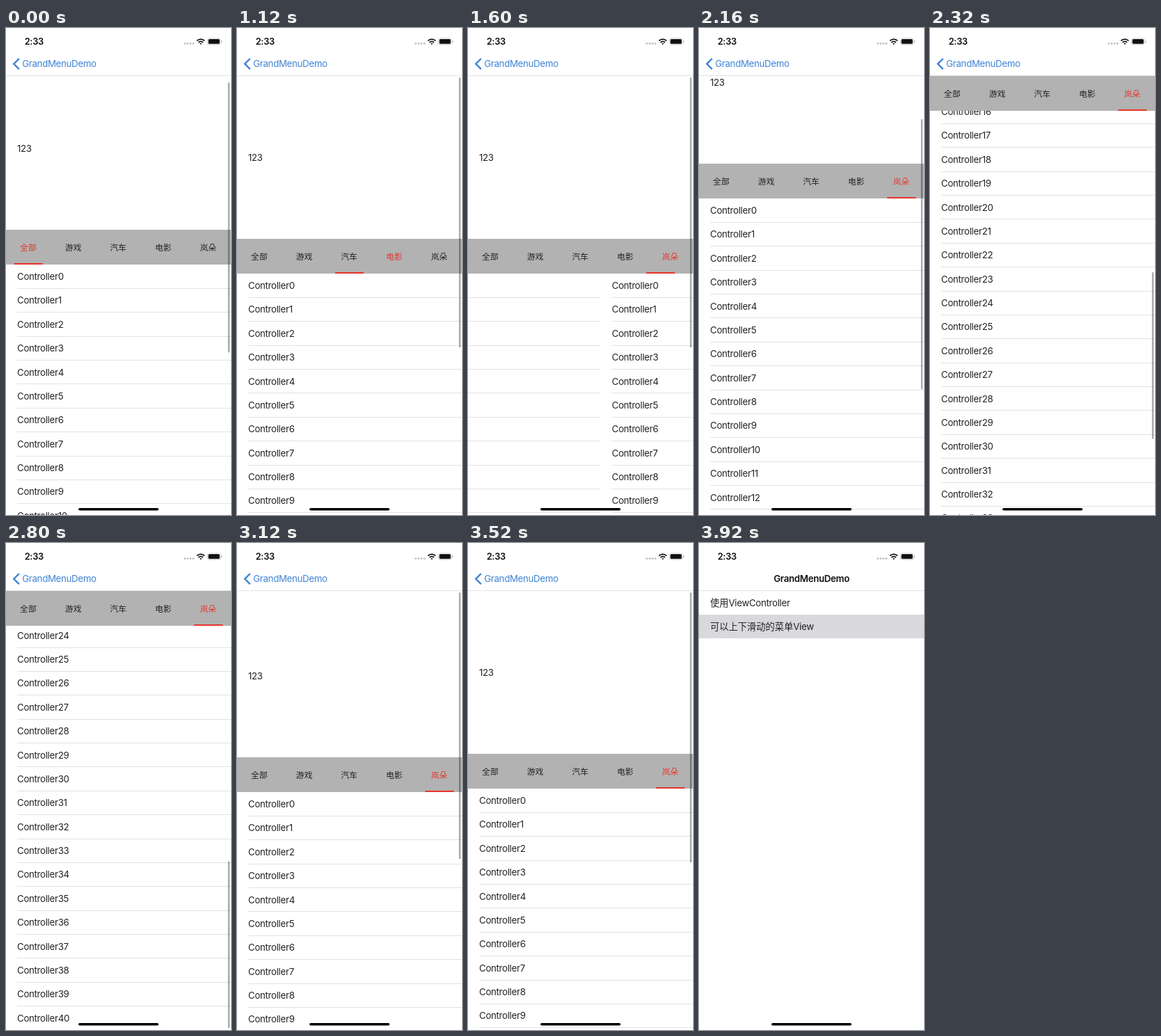
An HTML page with a canvas for the animation above (4.48 s loop, 323x700 px).

```html
<!DOCTYPE html>
<html lang="zh-CN">
<head>
<meta charset="utf-8">
<title>GrandMenuDemo</title>
<style>
html, body { margin: 0; width: 100%; height: 100%; overflow: hidden; background: #fff; }
canvas { display: block; width: 323px; height: 700px; }
</style>
</head>
<body>
<canvas id="stage"></canvas>
<script>
const W = 323, H = 700, LOOP = 4480;
const NAV = 69, HEADER = 234, MENU = 50, ROW = 34.375, ROWS = 41;
const MAX = NAV + HEADER + MENU + ROW * ROWS - H;
const TABS = ['全部', '游戏', '汽车', '电影', '岚朵'];
const BLUE = [62, 132, 214], INK = '#222', RED = '#e8342b';
const FONT = 'Inter, "Noto Sans CJK SC", "Noto Sans CJK", sans-serif';

const canvas = document.getElementById('stage');
const g = canvas.getContext('2d');
const dpr = window.devicePixelRatio || 1;
canvas.width = W * dpr;
canvas.height = H * dpr;

// The screen refreshes only at these moments.
const every80 = (from, to) => Array.from({ length: (to - from) / 80 + 1 }, (_, i) => from + i * 80);
const ticks = [0, 1120, 1360, ...every80(1520, 1760), ...every80(2160, 2640),
  2800, ...every80(3040, 3280), 3520, 3840, 3920];

const scrollKeys = [[0, 13], [1120, 0], [2080, 0], [2160, 108], [2240, 440], [2320, 800],
  [2400, 1060], [2480, 1155], [2560, 1108], [2640, 1072], [2800, MAX], [2960, MAX],
  [3040, 520], [3120, -5], [3200, -22], [3280, -9], [3520, 0]];
const pageKeys = [[1440, 0], [1520, .08], [1600, .41], [1680, .85], [1760, 1]];
const tabKeys = [[0, 0], [1120, 2], [1360, 3], [1440, 3], [1520, 3.25], [1600, 3.78], [1680, 4]];
const popKeys = [[3760, 0], [3840, .72], [3920, 1]];

function at(keys, t) {
  const i = keys.findIndex(k => k[0] > t);
  if (i === 0) return keys[0][1];
  if (i < 0) return keys[keys.length - 1][1];
  const [t0, a] = keys[i - 1], [t1, b] = keys[i];
  return a + (b - a) * (t - t0) / (t1 - t0);
}

function rect(x, y, w, h, color) {
  g.fillStyle = color;
  g.fillRect(x, y, w, h);
}

function pill(x, y, w, h, r, color) {
  g.fillStyle = color;
  g.beginPath();
  g.roundRect(x, y, w, h, r);
  g.fill();
}

// Draws text around a vertical centre; Chinese keeps its natural spacing.
function text(str, x, y, color = INK, weight = 400, size = 13.26) {
  const han = str.match(/^[^\x00-\x7f]*/)[0];
  g.fillStyle = color;
  g.font = `${weight} ${size}px ${FONT}`;
  g.letterSpacing = '0px';
  g.fillText(han, x, y + 4.7);
  const latinX = x + g.measureText(han).width;
  g.letterSpacing = '-0.3px';
  g.fillText(str.slice(han.length), latinX, y + 4.7);
}

function list(x, top) {
  for (let i = 0; i < ROWS; i++) {
    const y = top + i * ROW;
    if (y > H || y < -ROW) continue;
    text('Controller' + i, x + 16, y + 17.4);
    rect(x + 16, Math.floor(y + ROW), W - 16, 1, '#e2e2e2');
  }
}

function menu(y, tab, selected) {
  rect(0, y, W, MENU, '#b2b2b2');
  const step = W / TABS.length;
  TABS.forEach((name, i) =>
    text(name, step * (i + .5) - 12.2, y + 25, i === selected ? RED : INK, 400, 11.8));
  rect(step * (tab + .5) - 20.5, y + MENU - 2, 41, 2, RED);
}

function scrollBar(scroll) {
  let y, len;
  if (scroll <= HEADER) {
    y = 71 + Math.max(0, scroll) * .556;
    len = 388.5 + Math.min(0, scroll);
  } else {
    const over = Math.max(0, scroll - MAX);
    const part = Math.min(1, (scroll - HEADER) / (MAX - HEADER));
    len = 240 - over * .87;
    y = 121 + part * (697.5 - 121 - len);
  }
  pill(318.7, y, 2.3, len, 1.15, 'rgba(0,0,0,.35)');
}

function menuScreen(t) {
  const scroll = at(scrollKeys, t), page = at(pageKeys, t);
  const top = NAV + HEADER - scroll;
  rect(0, 0, W, H, '#fff');
  if (page < 1) list(-page * W, top + MENU);
  if (page > 0) list((1 - page) * W, top + MENU);
  if (top > NAV) {
    rect(0, 0, W, top, '#fff');
    text('123', 16, top - HEADER / 2);
  }
  menu(Math.max(NAV, top), at(tabKeys, t), t < 1120 ? 0 : t < 1520 ? 3 : 4);
  scrollBar(scroll);
}

function rootScreen() {
  rect(0, 0, W, H, '#fff');
  text('使用ViewController', 16, 86);
  rect(0, 103, W, 34, '#d9d9dd');
  text('可以上下滑动的菜单View', 16, 120.3);
}

function statusBar() {
  text('2:33', 26.7, 19.5, '#111', 600, 12.8);
  g.fillStyle = '#c4c4c4';
  for (let i = 0; i < 4; i++) {
    g.beginPath();
    g.arc(256.7 + i * 4.1, 22.3, 1.5, 0, 7);
    g.fill();
  }
  g.strokeStyle = '#111';
  g.lineWidth = 1.8;
  for (const r of [1.3, 4.6, 7.8]) {
    g.beginPath();
    g.arc(279.6, 24, r, -Math.PI * .75, -Math.PI * .25);
    g.stroke();
  }
  g.strokeStyle = '#c0c0c0';
  g.lineWidth = .8;
  g.beginPath();
  g.roundRect(289.2, 14.9, 18.8, 9, 2.6);
  g.stroke();
  pill(290.5, 16.1, 16.2, 6.6, 1.5, '#111');
  pill(309, 17.9, 1.2, 3, .6, '#b4b4b4');
}

function navBar(pop) {
  rect(0, 0, W, NAV, '#fff');
  rect(0, NAV - 1, W, 1, '#e2e2e2');
  statusBar();
  const color = `rgb(${BLUE.map(c => Math.round(c + (17 - c) * pop))})`;
  text('GrandMenuDemo', 23.2 + 84 * pop, 51.5, color, pop > .5 ? 600 : 400);
  g.globalAlpha = 1 - pop;
  g.strokeStyle = `rgb(${BLUE})`;
  g.lineWidth = 2.4;
  g.beginPath();
  g.moveTo(18.8, 44);
  g.lineTo(11.2, 51.6);
  g.lineTo(18.8, 59.2);
  g.stroke();
  g.globalAlpha = 1;
}

function draw(t) {
  const pop = at(popKeys, t);
  g.setTransform(dpr, 0, 0, dpr, 0, 0);
  rect(0, 0, W, H, '#fff');
  if (pop > 0) {
    g.save();
    g.translate((pop - 1) * W * .3, 0);
    rootScreen();
    g.restore();
    rect(0, 0, W, H, `rgba(0,0,0,${(1 - pop) * .1})`);
  }
  if (pop < 1) {
    g.save();
    g.translate(pop * W, 0);
    menuScreen(t);
    g.restore();
  }
  navBar(pop);
  pill(104, 690, 115, 3.5, 1.75, '#000');
}

const start = performance.now();
function frame() {
  const now = (performance.now() - start) % LOOP;
  draw(ticks.filter(t => t <= now).pop());
  requestAnimationFrame(frame);
}
frame();
</script>
</body>
</html>
```
